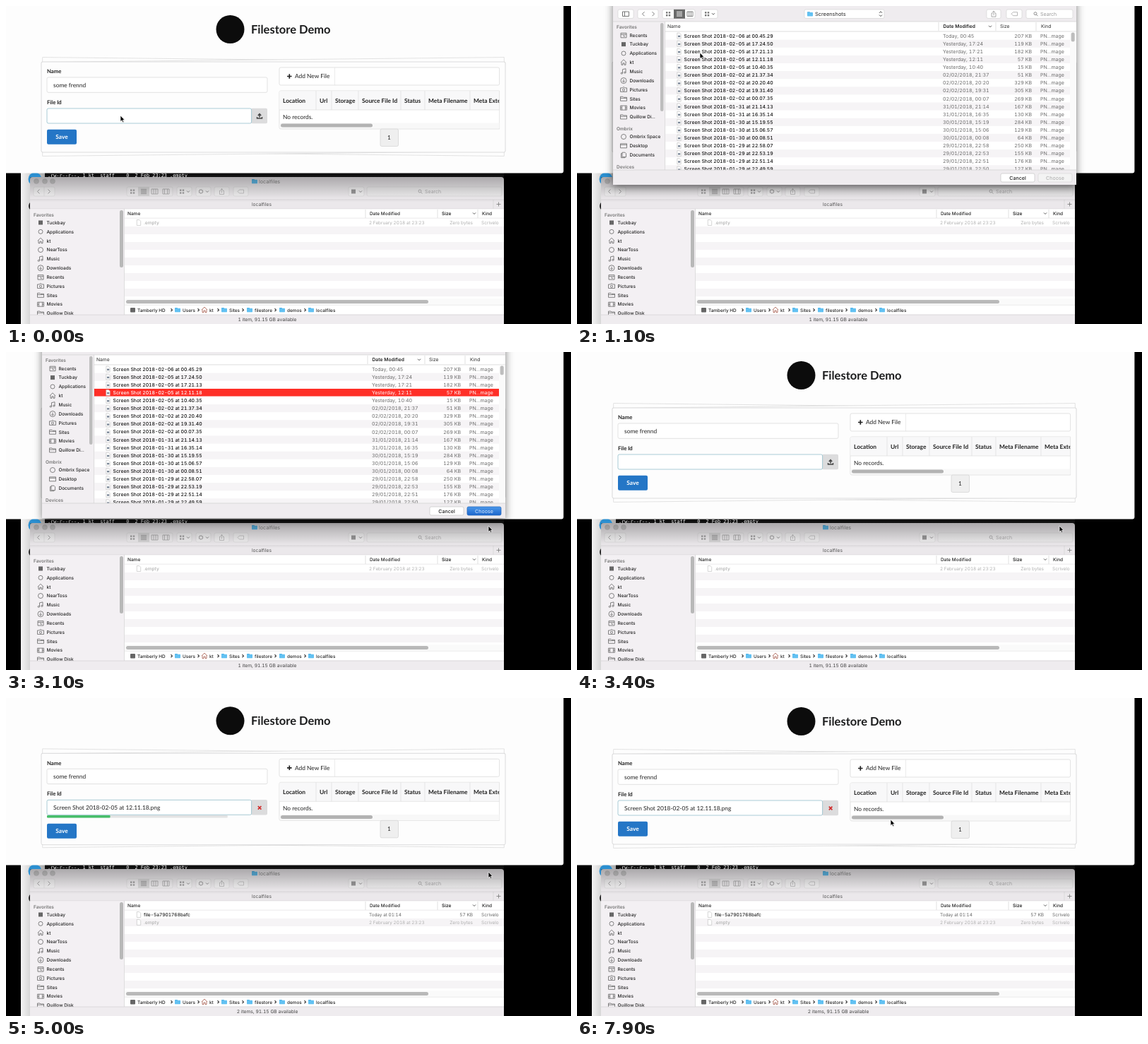
Write an HTML page that moves like this. It is 800 px wide and 450 px high and loops after 8 s.

```html
<!DOCTYPE html>
<html lang="en">
<head>
<meta charset="utf-8">
<title>Filestore Demo</title>
<style>
html, body { margin: 0; width: 100%; height: 100%; overflow: hidden; background: #000; }
svg { display: block; width: 800px; height: 450px; font-family: Inter, "Open Sans", sans-serif; font-variant-numeric: tabular-nums; text-rendering: geometricPrecision; }
text { white-space: pre; }
.web { font-family: Lato, sans-serif; }
.b { font-weight: 700; }
.m { font-weight: 500; }
#sheet { filter: drop-shadow(0 3px 6px rgba(0,0,0,.5)); }
</style>
</head>
<body>
<svg id="stage" viewBox="0 0 800 450"></svg>
<script>
const LOOP = 8000, STEP = 100;

// Drawing helpers; text is centred vertically on y
const text = (x, y, s, size = 6.6, fill = '#2b2b2b', more = '') =>
  `<text x="${x}" y="${y + size * .36}" font-size="${size}" fill="${fill}" ${more}>${s}</text>`;
const rect = (x, y, w, h, fill, more = '') =>
  `<rect x="${x}" y="${y}" width="${w}" height="${h}" fill="${fill}" ${more}/>`;
const box = (x, y, w, h, fill = '#fff', stroke = '#d6d6d6', r = 2) =>
  rect(x, y, w, h, fill, `rx="${r}" stroke="${stroke}" stroke-width=".7"`);
const path = (d, stroke = '#666', w = .8, more = '') =>
  `<path d="${d}" fill="none" stroke="${stroke}" stroke-width="${w}" ${more}/>`;
const circle = (x, y, r, fill, more = '') => `<circle cx="${x}" cy="${y}" r="${r}" fill="${fill}" ${more}/>`;
const group = (id, body, more = '') => `<g id="${id}" ${more}>${body}</g>`;
const MID = 'text-anchor="middle"', END = 'text-anchor="end"';

const shapes = {
  apps: 'M-3 0a3 3 0 1 0 6 0a3 3 0 1 0-6 0',
  home: 'M-4 0L0-4L4 0M-3-.5V3.5H-1V1H1V3.5H3V-.5',
  near: 'M-3.5 0a3.5 3.5 0 1 0 7 0a3.5 3.5 0 1 0-7 0',
  note: 'M-1.5 2.5V-3L3-4V1.5M-1.5 2.5a1.2 1 0 1 1-2.4 0a1.2 1 0 1 1 2.4 0M3 1.5a1.2 1 0 1 1-2.4 0a1.2 1 0 1 1 2.4 0',
  down: 'M-4 0a4 4 0 1 0 8 0a4 4 0 1 0-8 0M0-2V2M-1.7.5L0 2.2L1.7.5',
  clock: 'M-4-3H4V3.5H-4ZM-4-1H4M0 0V1.5H2',
  camera: 'M-4.5-2.5H-2L-1-3.5H1L2-2.5H4.5V3H-4.5ZM-1.6.2a1.6 1.6 0 1 0 3.2 0a1.6 1.6 0 1 0-3.2 0',
  folder: 'M-4.5 3V-3H-1L0-2H4.5V3ZM-4.5-.8H4.5',
  film: 'M-4.5-3H4.5V3H-4.5ZM-2.5-3V3M2.5-3V3M-4.5 0H-2.5M2.5 0H4.5',
  desk: 'M-4.5-3H4.5V3H-4.5ZM-4.5-1.5H4.5',
  docs: 'M-2-3.5H2L3.5-2V3H-2ZM-2-2H-3.5V4H2V3',
};
const icon = (k, x, y, c = '#666') => k === 'square'
  ? rect(x - 3, y - 3, 6, 6, c)
  : path(shapes[k], c, .8, `transform="translate(${x} ${y})"`);
const folder = (x, y) => rect(x - 4, y - 3, 4, 3, '#4aaee5', 'rx=".6"') + rect(x - 4, y - 2.2, 8, 5.4, '#62c1f2', 'rx=".6"');
const page = (x, y) => path(`M${x - 2.7} ${y - 4}h3.4l2 2v6h-5.4z`, '#bbb', .6, 'style="fill:#fff"');
const lens = (x, y) => circle(x, y, 2, 'none', 'stroke="#777" stroke-width=".8"') + path(`M${x + 1.5} ${y + 1.5}l2 2`);
const chevron = (x, y) => path(`M${x - 2} ${y - 1}l2 2l2-2`, '#444', .9);
const arrows = (x, y, gap) => path(`M${x + 1.5} ${y - 3}l-3 3l3 3M${x + gap - 1.5} ${y - 3}l3 3l-3 3`, '#777', 1);
const grid = (x, y) => [-3, .8].map(a => [-3, .8].map(b => rect(x + a, y + b, 2.4, 2.4, '#777')).join('')).join('');
const lines = (x, y, c = '#555') => path(`M${x - 4} ${y - 3}h8m-8 2h8m-8 2h8m-8 2h8`, c, .8);
const share = (x, y) => path(`M${x - 1.5} ${y - 1}h-1.5v5h6v-5h-1.5M${x} ${y + 2}v-6m-2 2l2-2l2 2`, '#888', .7);
const tag = (x, y) => path(`M${x - 4} ${y}l2.5-2.5h6v5h-6z`, '#999', .7);

const places = {
  Recents: 'clock', Tuckbay: 'square', Applications: 'apps', kt: 'home', NearToss: 'near', Music: 'note',
  Downloads: 'down', Pictures: 'camera', Sites: 'folder', Movies: 'film', 'Quillow Disk': 'folder',
  'Quillow Di...': 'folder', 'Ombrix Space': 'near', Desktop: 'desk', Documents: 'docs',
};
const sidebar = (names, x, y) => names.map((n, i) =>
  icon(places[n], x, y + i * 12.85) + text(x + 8.5, y + i * 12.85, n, 6.5, '#222', 'class="m"')).join('');
const stripes = (x, y, w, n, pitch) => Array.from({ length: n }, (_, i) =>
  i % 2 ? rect(x, y + i * pitch, w, pitch, '#f6f4f6') : '').join('');
const dividers = (xs, y, h, c = '#d5d5d5') => xs.map(x => path(`M${x} ${y}v${h}`, c, .7)).join('');

function desktop() {
  return rect(21, 236, 34, 214, 'url(#edge)') + circle(41, 245, 9.5, '#2b8fd0') + circle(39, 283, 7, '#222') +
    rect(55, 236, 650, 8, '#101010') +
    text(59, 240, '.rw-r--r--. 1 kt  staff    0  2 Feb 23:23 .empty', 6.85, '#f4f4f4', 'font-family="DejaVu Sans Mono, monospace"');
}

function finderTools() {
  return box(39, 256, 30, 13) + arrows(46, 262.5, 15) + dividers([54], 256, 13) +
    box(171, 256, 65, 13, '#f9f9f9') + rect(187, 256, 16, 13, '#d0d0d0') + grid(179, 262.5) + lines(195, 262.5) +
    path('M206 259h9v7h-9zm3 0v7m3-7v7M222 259h9v7h-9zm2.5 0v7m4-7v7', '#777', .8) +
    box(242, 256, 21, 13) + grid(249, 262.5) + chevron(258, 262.5) +
    box(269, 256, 21, 13) + circle(276, 262.5, 2.5, 'none', 'stroke="#777" stroke-width="1.6" stroke-dasharray="1.4 .5"') + chevron(285, 262.5) +
    box(295, 256, 21, 13) + share(305.5, 262.5) + box(322, 256, 21, 13) + tag(332, 262.5) +
    box(485, 256, 22, 13) + rect(489, 259.5, 6, 6, '#666') + chevron(502, 262.5) +
    box(511, 256, 191, 13, '#f8f8f8') + lens(586, 262) + text(593, 262.5, 'Search', 7, '#888');
}

function finder() {
  const crumbs = [['Tamberly HD', 186], ['Users', 250], ['kt', 288], ['Sites', 316], ['filestore', 352], ['demos', 398], ['localfiles', 439]];
  const ends = [234.5, 272.5, 300.5, 335.5, 381.5, 423.5];
  const file = (id, name, date, size, ink, dim) => group(id, page(188, 306.5) + text(195, 306.5, name, 6.6, ink, 'class="m"') +
    text(514, 306.5, date, 6.4, dim) + text(661, 306.5, size, 6.5, dim, END) + text(673, 306.5, 'Scrivelo', 6.5, dim));
  return rect(34, 242, 671, 220, '#f4f1f4', 'rx="4"') +
    [43, 55, 66].map(x => circle(x, 248, 3.5, '#d2d1d2', 'stroke="#bbb" stroke-width=".4"')).join('') +
    folder(352, 248) + text(358, 248, 'localfiles', 7.2, '#888') + group('tools', finderTools(), 'opacity=".6"') +
    rect(34, 274, 671, 13, '#ebe8eb') + path('M34 274H705M34 287H705', '#d6d3d6', .7) +
    text(362, 280.5, 'localfiles', 6.7, '#555', MID) + path('M694.5 280.5h6m-3-3v6', '#777', .8) + dividers([690], 274, 13) +
    rect(34, 287.4, 133, 150, '#f3f0f3') + text(39, 295.5, 'Favorites', 6.5, '#777', 'font-weight="600"') +
    `<g clip-path="url(#side)">${sidebar(['Tuckbay', 'Applications', 'kt', 'NearToss', 'Music', 'Downloads', 'Recents', 'Pictures', 'Sites', 'Movies', 'Quillow Disk'], 49, 306.5)}</g>` +
    rect(161, 289, 5, 81, '#b8b8b8', 'rx="2.5"') +
    rect(168, 287.4, 537, 149, '#fff') + text(172, 293.5, 'Name', 6.5, '#222', 'class="m"') + text(515, 293.5, 'Date Modified', 6.4, '#222', 'class="m"') +
    text(617, 293.5, 'Size', 6.5, '#222', 'font-weight="600"') + chevron(663, 293.5) + text(674, 293.5, 'Kind', 6.5, '#222', 'class="m"') +
    dividers([167.5], 287, 150) + dividers([509, 611, 668], 288, 12) + path('M168 300.3H705', '#d9d9d9', .7) +
    rect(168, 300.8, 537, 113.5, '#f8f6f8') +
    group('stripes', rect(168, 300.8, 537, 113.5, '#fff') + stripes(168, 301, 537, 10, 11)) +
    file('added', 'file-5a7901768bafc', 'Today at 01:14', '57 KB', '#222', '#666') +
    file('empty', '.empty', '2 February 2018 at 23:23', 'Zero bytes', '#b0b0b0', '#b0b0b0') +
    rect(168, 414.5, 537, 8.5, '#fafafa') + rect(170, 416, 428, 5, '#b9b9b9', 'rx="2.5"') +
    path('M168 423.2H705', '#ddd', .6) + rect(176, 427, 7, 6.5, '#666', 'rx="1"') +
    crumbs.map(([s, x], i) => (i === 2 ? icon('home', 281, 430, '#a5584a') : i ? folder(x - 7, 430) : '') + text(x, 430.3, s, 6.4, '#222', 'class="m"')).join('') +
    ends.map(x => path(`M${x - 1} 428.2l1.9 2l-1.9 2`, '#333', 1.2)).join('') +
    rect(34, 437, 671, 13, '#efecef') + path('M34 437H705', '#d2cfd2', .7) +
    text(370, 443.7, '', 6.7, '#444', `id="status" ${MID}`) + rect(34, 242, 671, 36, 'url(#fall)');
}

function web() {
  const dark = '#222', heads = { Location: 392, Url: 444, Storage: 466, 'Source File Id': 504, Status: 564, 'Meta Filename': 598, 'Meta Extension': 662 };
  const bold = 'class="b"';
  const tilt = a => `<rect x="51" y="76" width="655" height="133" fill="#fdfdfd" stroke="#d0d0d0" stroke-width=".6" transform="rotate(${a} 378.5 142.5)"/>`;
  const panel = tilt(.6) + tilt(-.6) + rect(50, 79, 657, 128, '#fdfdfd', 'id="panel" rx="2" stroke="#d4d4d5" stroke-width=".8"');
  const form = text(58, 92.5, 'Name', 7.7, dark, bold) + box(58, 101, 312, 21.3) + text(67, 112, 'some frennd', 8.4, dark) +
    text(58, 136, 'File Id', 7.7, dark, bold) + rect(347, 144.8, 23, 21.4, '#dcdcdd', 'rx="2"') +
    box(58, 145, 289.6, 21, '#fff', '#85b7c4') + group('chosen', text(67, 155.8, 'Screen Shot 2018-02-05 at 12.11.18.png', 8.4, dark)) +
    group('upload', path('M359 157.5v-4.5m-2.2 2l2.2-2.3l2.2 2.3', '#444', 1.5) + path('M355.5 157v2h7v-2', '#444', 1.5)) +
    group('remove', path('M356.8 153.7l4.6 4.6m0-4.6l-4.6 4.6', '#d02a2a', 1.7)) +
    group('progress', rect(58, 166.6, 312, 3.5, '#dedede', 'id="track" rx="1"') + rect(58, 166.6, 312, 3.5, '#21b14b', 'id="fill" rx="1"') +
      text(214, 177, '', 7.2, dark, `id="percent" class="b" ${MID}`));
  const table = box(387, 87, 311.6, 25) + dividers([465.5], 87, 25, '#e2e2e2') + path('M398 99.5h6.6m-3.3-3.3v6.6', dark, 1.7) +
    text(409, 99.3, 'Add New File', 8.4, dark) +
    `<g clip-path="url(#cells)">${box(387, 120, 330, 54) + rect(387.4, 120.4, 312, 26.6, '#f8f8f9') + path('M387 147H699', '#ddd', .7) +
      dividers([439, 461, 499, 559, 593, 657], 120, 27, '#dedede') +
      Object.entries(heads).map(([s, x]) => text(x, 134, s, 8.4, dark, bold)).join('')}</g>` +
    dividers([698.6], 120, 54, '#ddd') + text(392, 156.7, 'No records.', 8.4, dark) +
    rect(387.5, 165.5, 311, 7.5, '#f8f8f8') + rect(389, 166.6, 130, 5, '#b3b3b3', 'rx="2.5"') +
    box(530, 174, 25.5, 24.5, '#efefef', '#d2d2d2') + text(542.5, 186, '1', 8.4, dark, MID);
  return `<g class="web">${rect(-8, -8, 797.4, 244.5, '#fdfdfd', 'rx="3"')}` +
    group('body', circle(317.5, 33, 20, '#0c0c0c') + text(347, 33, 'Filestore Demo', 16.5, '#1b1c1d', bold) + panel + form + table) +
    group('save', rect(58, 174.8, 42, 21, '#2476c6', 'rx="2"') + text(79, 185.3, 'Save', 8.4, '#fff', `class="b" ${MID}`)) + '</g>';
}

// Month-day, time and size in KB of each listed shot
const shots = `02-06 00.45.29 207|02-05 17.24.50 119|02-05 17.21.13 182|02-05 12.11.18 57|02-05 10.40.35 15|02-02 21.37.34 51
02-02 20.20.40 329|02-02 19.31.40 305|02-02 00.07.35 269|01-31 21.14.13 167|01-31 16.35.14 130|01-30 15.19.55 284
01-30 15.06.57 129|01-30 00.08.51 64|01-29 22.58.07 250|01-29 22.53.19 155|01-29 22.51.14 176|01-29 22.49.59 127`.split(/[|\n]/);

function shotRow(line, i, picked) {
  const [day, time, kb] = line.split(' '), [mon, d] = day.split('-'), [h, m, s] = time.split('.');
  const date = { '02-06': 'Today', '02-05': 'Yesterday' }[day] || `${d}/${mon}/2018`;
  const y = 42.2 + i * 11.1, ink = picked ? '#fff' : '#151515', dim = picked ? '#fff' : '#6c6c6c';
  return (picked ? rect(125, y - 5.5, 573, 10.6, '#ff2f27') : '') + page(144.5, y) + rect(143, y - .5, 3.2, 2.4, '#7b8797') +
    text(151.5, y, `Screen Shot 2018-${day} at ${time}`, 6.85, ink, 'class="m"') +
    text(518, y, `${date}, ${h}:${s === '59' ? +m + 1 : m}`, 7.05, dim) +
    text(644, y, kb + ' KB', 7, dim, END) + text(656, y, 'PN...mage', 7, dim);
}

function sheet() {
  const names = ['Recents', 'Tuckbay', 'Applications', 'kt', 'Music', 'Downloads', 'Pictures', 'Sites', 'Movies', 'Quillow Di...'];
  const head = (y, s) => text(56, y, s, 6.5, '#777', 'font-weight="600"');
  return rect(51, -12, 656, 265, '#efecef') +
    box(58, 5, 22, 12.5) + path('M64.5 8h9v6.5h-9zm3 0v6.5', '#666', .9) + box(86, 5, 29, 12.5) + arrows(94, 11.2, 14) +
    box(121, 5, 46, 12.5) + grid(129, 11.2) + rect(137, 4.8, 16, 13, '#6a6a6a') + lines(145, 11.2, '#fff') +
    path('M156 8h8v6.5h-8zm2.7 0v6.5m2.7-6.5v6.5', '#666', .8) + box(176, 5, 23, 12.5) + grid(184, 11.2) + chevron(193, 11.2) +
    box(322, 5, 113, 12.5) + folder(330, 11.2) + text(337, 11.2, 'Screenshots', 7.4) + path('M428 9.8l2-2l2 2m-4 2.8l2 2l2-2', '#444', 1) +
    box(580, 5, 20, 12.5) + share(590, 11.2) + box(608, 5, 22, 12.5) + tag(619, 11.2) + box(636, 5, 66, 12.5) + lens(649, 10.7) + text(656, 11.2, 'Search', 7, '#999') +
    rect(51, 22, 73, 210, '#f2eff2') + head(30, 'Favorites') + sidebar(names, 66, 41.3) +
    head(174, 'Ombrix') + sidebar(['Ombrix Space', 'Desktop', 'Documents'], 66, 185) + head(227.5, 'Devices') +
    rect(118, 24, 4.5, 125, '#bdbdbd', 'rx="2.2"') +
    rect(125, 22, 582, 210, '#fff') + path('M51 22H707M125 36H707', '#cfcfcf', .7) + dividers([124.6], 22, 210) +
    text(128, 28.8, 'Name', 6.7) + text(518.5, 28.8, 'Date Modified', 6.7, '#222', 'font-weight="600"') + chevron(585, 28.8) +
    text(599, 28.8, 'Size', 6.7) + text(657, 28.8, 'Kind', 6.7) + dividers([512, 593, 650], 23, 12) +
    `<g clip-path="url(#list)">${stripes(125, 36.6, 573, 18, 11.1) + shots.map((s, i) => shotRow(s, i)).join('') + group('picked', shotRow(shots[3], 3, true))}</g>` +
    rect(698, 36.5, 9, 195.5, '#fafafa') + rect(699.7, 37.5, 5, 13, '#bdbdbd', 'rx="2.5"') +
    path('M51 232H707', '#cfcfcf', .7) + box(600, 237, 48, 12, '#fff', '#c6c6c6') + text(624, 243, 'Cancel', 7.1, '#222', `class="m" ${MID}`) +
    box(653, 237, 48, 12, '#f3f3f3', '#d8d8d8') + text(677, 243, 'Choose', 7.1, '#aaa', MID) +
    group('choose', box(653, 237, 48, 12, 'url(#blue)', '#2467bd') + text(677, 243, 'Choose', 7.1, '#dcebff', MID));
}

const clip = (id, ...r) => `<clipPath id="${id}">${rect(...r, '#000')}</clipPath>`;
const fade = (id, a, b, dir) => `<linearGradient id="${id}" x2="${dir ? 0 : 1}" y2="${dir}"><stop stop-color="${a}"/><stop offset="1" stop-color="${b}"/></linearGradient>`;
stage.innerHTML = `<defs>${clip('side', 34, 287, 127, 150) + clip('cells', 386, 119, 312.6, 56) + clip('list', 125, 36.5, 582, 195.5) +
  fade('edge', '#f4f4f4', '#a8a8a8', 0) + fade('fall', 'rgba(0,0,0,.3)', 'rgba(0,0,0,0)', 1) + fade('blue', '#4c98ea', '#1c66cc', 1)}</defs>` +
  desktop() + finder() + web() + group('sheet', sheet()) +
  group('cursor', '<path d="M0 0V8.6L2 6.8L3.4 9.8L4.8 9.2L3.5 6.3H6Z" fill="#000" stroke="#fff" stroke-width=".7"/>');

// Motion tables: [ms, value...]
const keys = {
  cursor: [[0, 162, 155], [600, 163, 153], [900, 172, 95], [1100, 174, 66], [1400, 174, 74], [1800, 176, 76], [2100, 420, 150],
    [2400, 708, 249], [2700, 683, 246], [5800, 683, 246], [6100, 560, 225], [6400, 330, 195], [6600, 232, 187], [6800, 230, 187],
    [7100, 320, 213], [7400, 456, 203], [7600, 447, 187], [7800, 444, 172]],
  sheet: [[300, -275], [400, -150], [500, -45], [600, 0], [3000, 0], [3100, -18], [3200, -90], [3300, -195], [3400, -275]],
  lift: [[3499, 0], [3500, -1.8], [4880, -1.8], [5000, -.7], [5300, 0]],
  save: [[3499, 0], [3500, 4], [4880, 4], [5000, 3], [5300, 0]],
  hide: [[4880, 1], [5000, .82], [5100, .5], [5200, .15], [5300, 0]],
  load: [[3500, 0], [3800, 1], [4880, 1], [5000, .35], [5100, 0]],
  insert: [[4000, 0], [4100, .15], [4200, .6], [4300, 1]],
};
function at(name, t) {
  const k = keys[name], i = k.findIndex(p => p[0] > t);
  if (i < 1) return k[i ? k.length - 1 : 0].slice(1);
  const [a, b] = [k[i - 1], k[i]], f = (t - a[0]) / (b[0] - a[0]);
  return a.slice(1).map((v, j) => v + (b[j + 1] - v) * f);
}
const el = id => document.getElementById(id);
const move = (id, x, y) => el(id).setAttribute('transform', `translate(${x} ${y})`);
const show = (id, on) => el(id).setAttribute('opacity', +on);

function render(t) {
  const [lift] = at('lift', t), [hide] = at('hide', t), [load] = at('load', t), [ins] = at('insert', t);
  move('cursor', ...at('cursor', t));
  move('sheet', 0, at('sheet', t)[0]);
  move('body', 0, lift);
  move('save', 0, at('save', t)[0]);
  el('panel').setAttribute('height', 128 - 2 * lift);
  show('picked', t >= 1500);
  show('choose', t >= 1500);
  const sent = t >= 3500;
  show('chosen', sent);
  show('remove', sent);
  show('upload', !sent);
  show('progress', sent ? hide : 0);
  el('track').setAttribute('width', 312 * hide);
  el('fill').setAttribute('width', 312 * hide * load);
  el('percent').textContent = t < 4880 ? Math.round(load * 100) + '%' : '';
  move('empty', 0, 10.8 * ins);
  show('added', Math.max(0, ins * 2 - 1));
  show('stripes', ins === 0 || ins === 1);
  el('status').textContent = (t < 4000 ? '1 item' : '2 items') + ', 91.15 GB available';
}

const start = performance.now();
function tick() {
  const t = (performance.now() - start) % LOOP;
  render(Math.floor(t / STEP) * STEP);
  requestAnimationFrame(tick);
}
tick();
</script>
</body>
</html>
```
